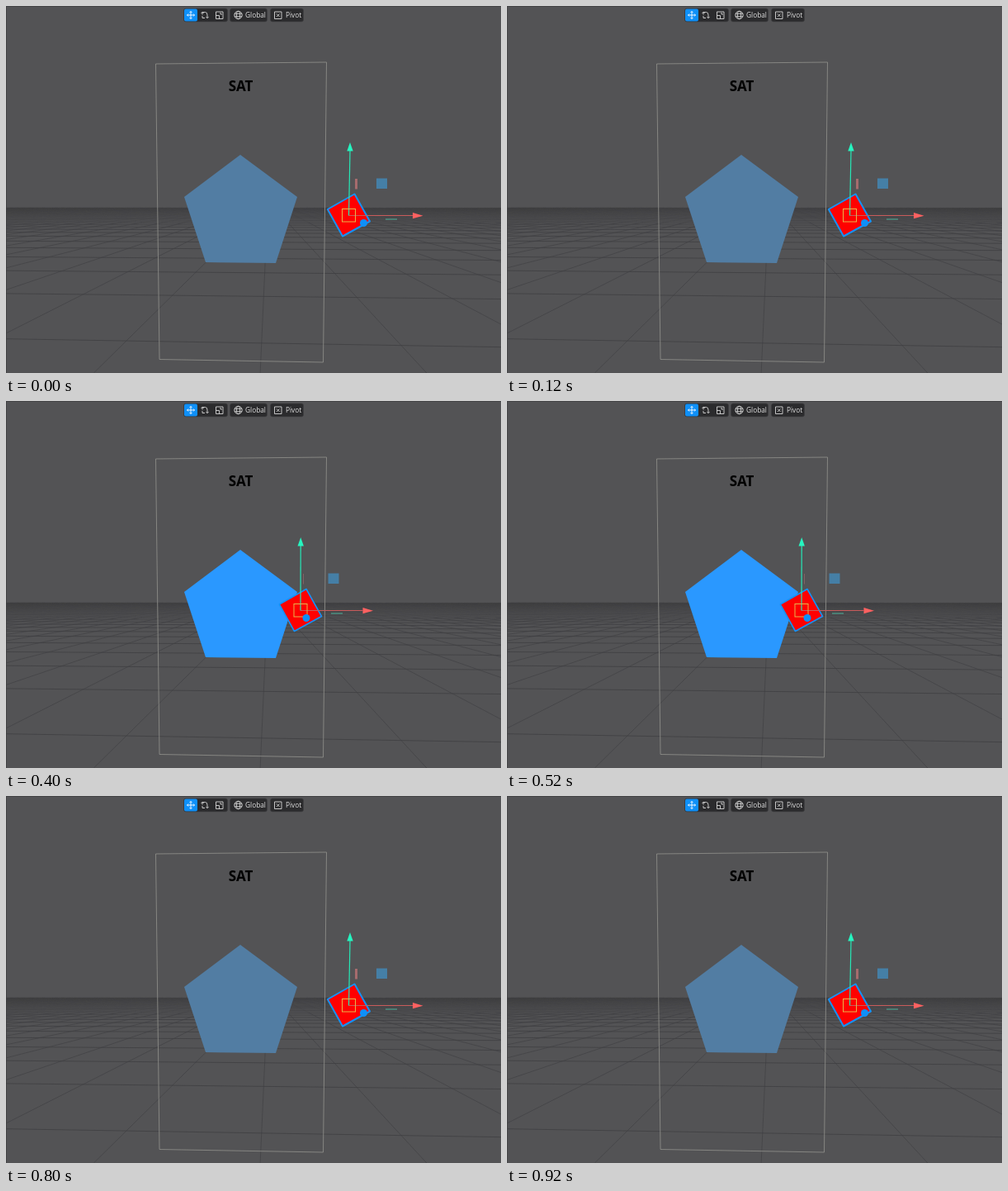
These frames come from a looping animation (600 px wide and 444 px high, 1000 ms). An HTML page:

```html
<!DOCTYPE html>
<html lang="en">
<head>
<meta charset="utf-8">
<title>Separating axis test</title>
<style>
  html, body { margin: 0; width: 100%; height: 100%; overflow: hidden; background: #535355; }
  svg { display: block; width: 100vw; height: 100vh; }
  text { font-family: "Open Sans", "Noto Sans", sans-serif; }
  .label { font-size: 8.3px; fill: #dedede; }
  .icon { fill: none; stroke: #d4d4d4; stroke-width: .9; }
</style>
</head>
<body>
<svg viewBox="0 0 600 444">
  <rect width="600" height="444" fill="#535355"/>
  <path d="M0 .5H600M.5 0V444" stroke="#434345" fill="none"/>
  <g id="floor" fill="none" stroke="#3f3f42" stroke-width=".8"/>
  <path d="M181.500 70L388.500 68L384.500 431L186 427.500Z" fill="none" stroke="#8c8c87" stroke-width=".9"/>
  <text x="284.500" y="103" font-size="17" font-weight="700" text-anchor="middle">SAT</text>
  <path id="pentagon" d="M284 180L353 231L327 311L242 310L216 231Z"/>

  <g id="toolbar">
    <g fill="#2b2b2d" stroke="#404042" stroke-width=".7">
      <rect x="215.500" y="3" width="53" height="16" rx="2.500"/>
      <rect x="271.500" y="3" width="45" height="16" rx="2.500"/>
      <rect x="320.500" y="3" width="40" height="16" rx="2.500"/>
    </g>
    <rect x="216" y="3.500" width="16" height="15" rx="2" fill="#0f90f8"/>
    <path class="icon" style="stroke:#fff" d="M219.500 11H228.500M224 6.500V15.500M221 9.500L219.500 11L221 12.500M227 9.500L228.500 11L227 12.500M222.500 8L224 6.500L225.500 8M222.500 14L224 15.500L225.500 14"/>
    <path class="icon" d="M238 10.500V7.500H241.500Q244 7.500 244 11V14.500M236.500 9L238 7.300L239.500 9M242.500 13L244 14.700L245.500 13M238 12V14.500H241"/>
    <path class="icon" d="M254.500 7H263V15.500H254.500ZM254.500 11.500H258.500V15.500M259 9H261V11"/>
    <g class="icon">
      <circle cx="281.500" cy="11" r="4.700"/>
      <ellipse cx="281.500" cy="11" rx="2.100" ry="4.700"/>
      <path d="M277 9.300H286M277 12.700H286"/>
    </g>
    <path class="icon" d="M325.500 7H334V15.500H325.500ZM328 9.500L331.500 13M331.500 9.500L328 13"/>
    <text class="label" x="290" y="14">Global</text>
    <text class="label" x="339" y="14">Pivot</text>
  </g>

  <path id="square" fill="#f00" stroke="#1592f8" stroke-linejoin="round"/>
  <path id="xAxis" fill="none" stroke="#c85b5b"/>
  <path id="xHead" fill="#ff6161"/>
  <path id="yAxis" fill="none" stroke="#26e8b6" stroke-width="1.200"/>
  <path id="yHead" fill="#26f5c0"/>
  <rect id="blueFace" width="13" height="12.500" y="208.500" fill="#457fa6"/>
  <rect id="redFace" y="209" height="12.500" fill="#a66b6d"/>
  <path id="greenFace" fill="none" stroke="#4faa94" stroke-width="1.100"/>
  <rect id="handle" y="245.500" width="16" height="15.500" fill="none" stroke="#e8b54a"/>
  <circle id="knob" cy="262.500" r="4.500" fill="#0f90f8"/>
</svg>
<script>
const $ = id => document.getElementById(id);
const set = (id, attrs) => {
  for (const [name, value] of Object.entries(attrs)) $(id).setAttribute(name, value);
};

// Perspective floor: rows at equal depth steps, columns through one vanishing point.
function drawFloor() {
  const eye = { x: 317.5, y: 236 };
  const line = (x1, y1, x2, y2, opacity) => {
    const path = document.createElementNS("http://www.w3.org/2000/svg", "path");
    path.setAttribute("d", `M${x1} ${y1}L${x2} ${y2}`);
    path.setAttribute("stroke-opacity", opacity);
    $("floor").append(path);
  };
  for (let n = 0; n <= 40; n++) {
    const drop = 1 / (0.006 + n * 0.00294);
    line(0, eye.y + drop, 600, eye.y + drop * 1.06, Math.min(1, 0.3 + drop / 50));
  }
  for (let n = -38; n <= 38; n++) {
    const slope = n * 0.97 - 0.045;
    const far = 8.2, near = 208, mid = 26;
    const at = d => [eye.x + slope * d, eye.y + d];
    line(...at(mid), ...at(near), 0.8);
    line(...at(far), ...at(mid), 0.3);
  }
}

// Gizmo faces narrow as the square nears the middle of the view.
const poses = [
  { x: 415.5, tip: 417, head: 493, knob: 433.5, red: [423, 3], green: 460, edge: 2 },
  { x: 386.2, tip: 387, head: 462, knob: 398.5, red: [391.6, 1.3], green: 426.5, edge: 2 },
  { x: 357, tip: 357.2, head: 432.5, knob: 364, red: [360.2, .6], green: 394, edge: 1.6 }
];

function render(time) {
  const step = Math.floor(time % 1000 / 200);
  const index = 2 - Math.abs(2 - step);
  const { x, tip, head, knob, red, green, edge } = poses[index];
  set("pentagon", { fill: index === 2 ? "#2a98ff" : "#527da3" });
  set("square", {
    d: `M${x - 25.7} 246L${x + 7} 227.5L${x + 25.5} 260.5L${x - 7.5} 278.500Z`,
    "stroke-width": edge
  });
  set("xAxis", { d: `M${x} 253.500H${head}` });
  set("xHead", { d: `M${head} 250L${head + 12.5} 253.700L${head} 257.300Z` });
  set("yAxis", { d: `M${x} 253.500L${tip} 175` });
  set("yHead", { d: `M${tip} 165L${tip + 3.7} 175.500H${tip - 3.7}Z` });
  set("blueFace", { x: x + 33.5 });
  set("redFace", { x: red[0], width: red[1] });
  set("greenFace", { d: `M${green} ${index ? 257 : 258}h14` });
  set("handle", { x: x - 8 });
  set("knob", { cx: knob });
}

drawFloor();
const start = performance.now();
function tick(now) {
  render(Math.max(0, now - start));
  requestAnimationFrame(tick);
}
render(0);
requestAnimationFrame(tick);
</script>
</body>
</html>
```
